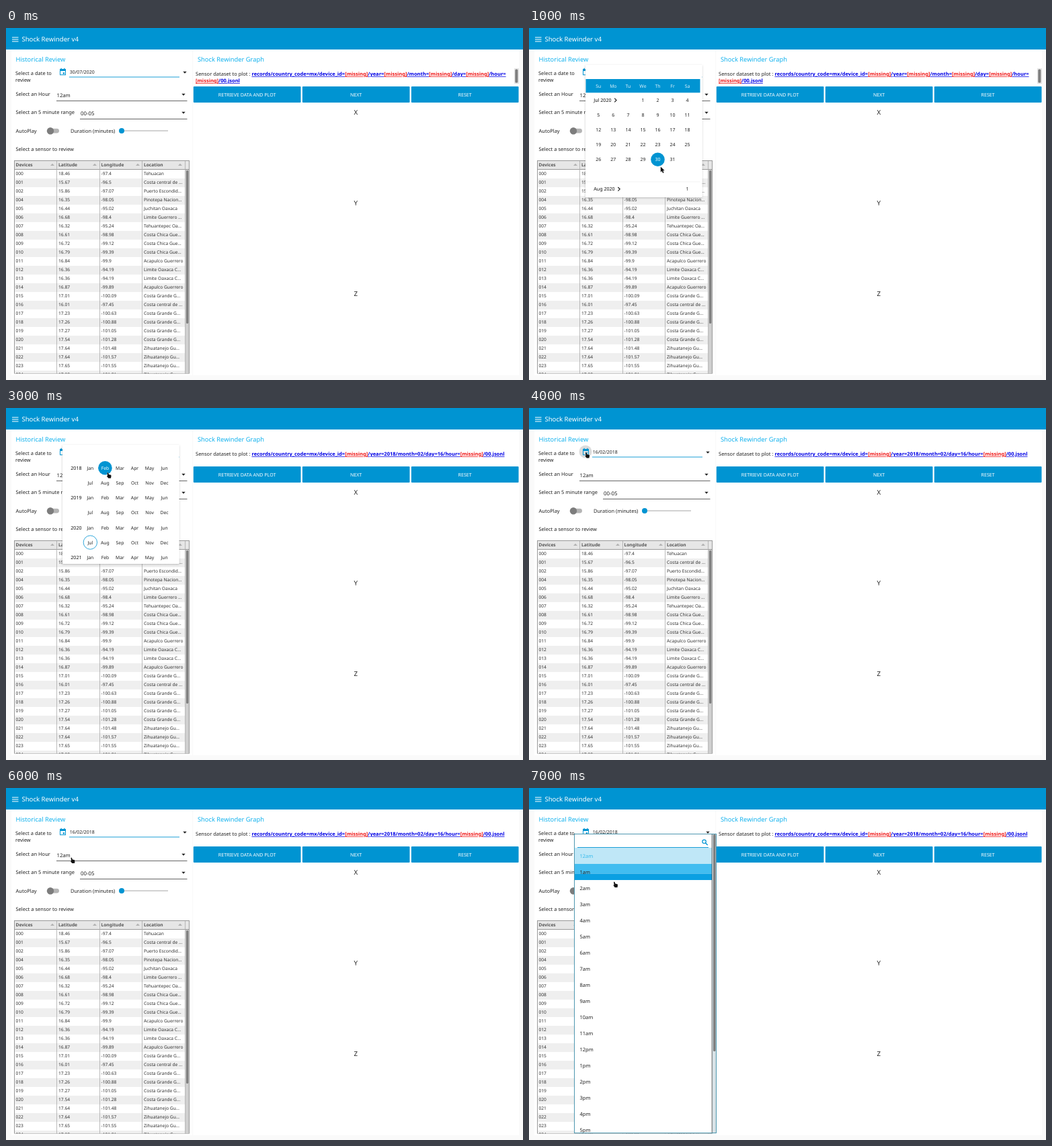
An HTML page that plays this animation: 769 px wide and 524 px high, repeating every 8000 ms.

```html
<!DOCTYPE html>
<html lang="en">
<head>
<meta charset="utf-8">
<title>Shock Rewinder v4</title>
<style>
  html, body { margin: 0; width: 100%; height: 100%; overflow: hidden; background: #fafafa; }
  svg { display: block; width: 769px; height: 524px; }
  text { font-family: "Noto Sans", sans-serif; font-size: 7.5px; fill: #222; white-space: pre; text-rendering: geometricPrecision; }
  .link tspan { font-weight: 700; fill: #0000e6; text-decoration: underline; }
  .link .miss { fill: #f01818; }
</style>
</head>
<body>
<svg id="stage" viewBox="0 0 769 524">
  <defs>
    <clipPath id="tableClip"><rect x="12" y="197" width="261" height="317.5"/></clipPath>
    <clipPath id="listClip"><rect x="67" y="68" width="212" height="446"/></clipPath>
    <filter id="shadow" x="-10%" y="-10%" width="120%" height="120%">
      <feDropShadow dx="0" dy="1" stdDeviation="1.6" flood-color="#000" flood-opacity=".22"/>
    </filter>
  </defs>
</svg>
<script>
const NS = 'http://www.w3.org/2000/svg';
const stage = document.getElementById('stage');
const BLUE = '#0094d2', CYAN = '#12b2ee', INK = '#222';

function add(parent, tag, attrs = {}, content) {
  const el = document.createElementNS(NS, tag);
  for (const key in attrs) el.setAttribute(key, attrs[key]);
  if (content !== undefined) el.textContent = content;
  parent.appendChild(el);
  return el;
}
const group = (parent, attrs) => add(parent, 'g', attrs);
const rect = (p, x, y, width, height, fill, more) => add(p, 'rect', { x, y, width, height, fill, ...more });
const disc = (p, cx, cy, r, fill, more) => add(p, 'circle', { cx, cy, r, fill, ...more });
const path = (p, d, fill, more) => add(p, 'path', { d, fill, ...more });
const stroke = (p, d, color, width = 1) => path(p, d, 'none', { stroke: color, 'stroke-width': width });
function text(p, x, y, str, size = 7.5, fill = INK, more = {}) {
  const el = add(p, 'text', { x, y, ...more }, str);
  el.style.fontSize = size + 'px';
  el.style.fill = fill;
  return el;
}
const centered = (p, x, y, str, size, fill, more) => text(p, x, y, str, size, fill, { 'text-anchor': 'middle', ...more });
const caret = (p, x, y) => path(p, `M${x - 2.7} ${y - 1.2}h5.4l-2.7 2.9z`, INK);

function drawShell(p) {
  rect(p, 0, 0, 769, 524, '#fafafa');
  rect(p, 8, 32, 269, 485, '#fff');
  rect(p, 278.5, 32, 484.5, 485, '#fff');
  rect(p, 0, 0, 769, 32, BLUE);
  stroke(p, 'M9 14h9.5M9 17h9.5M9 20h9.5', '#fff', 1.1);
  text(p, 23.4, 20, 'Shock Rewinder v4', 9.6, '#fff');
  text(p, 14.5, 50, 'Historical Review', 9.3, CYAN);
  text(p, 285, 50, 'Shock Rewinder Graph', 9.3, CYAN);
}

function drawForm(p) {
  text(p, 14, 70, 'Select a date to');
  text(p, 14, 80, 'review');
  stroke(p, 'M94 73h164', BLUE, .9);
  text(p, 14.5, 100.5, 'Select an Hour');
  text(p, 75.5, 102.5, '12am', 7.7);
  stroke(p, 'M75 108.5h194.5', '#555', .9);
  caret(p, 264, 99);
  text(p, 14.5, 127.5, 'Select an 5 minute range');
  text(p, 111, 129.5, '00-05', 7.8);
  stroke(p, 'M110 135.5h159.5', '#555', .9);
  caret(p, 264, 126);
  text(p, 14.5, 156, 'AutoPlay');
  rect(p, 62, 149.7, 17, 6.8, '#b5b5b5', { rx: 3.4 });
  disc(p, 66, 153.2, 5.2, '#7d7d7d');
  text(p, 96, 156, 'Duration (minutes)');
  stroke(p, 'M172 153h69', '#9a9a9a', .9);
  disc(p, 172, 153, 4, BLUE);
  text(p, 14.5, 183, 'Select a sensor to review');
}

const columns = [[14.5, 'Devices', 69], [78, 'Latitude', 132], [141.5, 'Longitude', 196], [205, 'Location', 259]];
const places = {
  T: 'Tehuacan', c: 'Costa central de …', P: 'Puerto Escondid…', N: 'Pinotepa Nacion…', J: 'Juchitan Oaxaca',
  L: 'Limite Guerrero …', O: 'Tehuantepec Oa…', C: 'Costa Chica Gue…', A: 'Acapulco Guerrero',
  X: 'Limite Oaxaca C…', G: 'Costa Grande G…', Z: 'Zihuatanejo Gu…'
};
const sensors = `18.46 -97.4 T|15.67 -96.5 c|15.86 -97.07 P|16.35 -98.05 N|16.44 -95.02 J|16.68 -98.4 L
|16.32 -95.24 O|16.61 -98.98 C|16.72 -99.12 C|16.79 -99.39 C|16.84 -99.9 A|16.36 -94.19 X|16.36 -94.19 X
|16.87 -99.89 A|17.01 -100.09 G|16.01 -97.45 c|17.23 -100.63 G|17.26 -100.88 G|17.27 -101.05 G
|17.54 -101.28 G|17.64 -101.48 Z|17.64 -101.57 Z|17.65 -101.55 Z|17.98 -101.81 Z`.split('|');

function drawTable(parent) {
  const p = group(parent, { 'clip-path': 'url(#tableClip)' });
  rect(p, 12, 197, 261, 318, '#fff');
  sensors.forEach((line, i) => {
    const y = 211 + 13 * i;
    if (i % 2) rect(p, 12, y, 254.5, 13, '#efefef');
    const [lat, lon, key] = line.trim().split(' ');
    const id = String(i < 3 ? i : i + 1).padStart(3, '0');
    [id, lat, lon, places[key]].forEach((cell, c) => text(p, columns[c][0], y + 8.4, cell, 6.65, '#333'));
  });
  rect(p, 12, 197, 261, 13.5, '#e6e6e6');
  stroke(p, 'M12 210.5h261', '#999');
  for (const [x, label, arrow] of columns) {
    text(p, x, 206, label, 6.65, '#555', { 'font-weight': 700 });
    path(p, `M${arrow - 3} 205h6l-3 -3.2z`, '#b2b2b2');
  }
  stroke(p, 'M75.5 197v318M139.5 197v318M202.5 197v318M266.5 197v318', '#aaa', .8);
  rect(p, 267, 211, 6, 304, '#cfcfcf');
  rect(p, 268, 212, 3.3, 228, '#7e7e7e', { rx: 1.6 });
  rect(p, 12.5, 197.5, 260, 317, 'none', { stroke: '#999' });
}

function drawPlots(p) {
  ['RETRIEVE DATA AND PLOT', 'NEXT', 'RESET'].forEach((label, i) => {
    const x = 278.8 + 162 * i;
    rect(p, x, 87, 159.7, 24, BLUE, { rx: 1 });
    centered(p, x + 79.8, 101.5, label, 7.05, '#fff');
  });
  ['X', 'Y', 'Z'].forEach((axis, i) => centered(p, 520.3, 128.5 + 135 * i, axis, 9.7));
}

// Unset parts of the dataset path are shown in red.
function drawPath(p, rows) {
  rows.forEach((row, i) => {
    const line = text(p, 282, 71 + 10 * i, '', 7.53, INK, { class: 'link' });
    if (!i) line.append('Sensor dataset to plot : ');
    row.split(/(\[missing\])/).filter(Boolean).forEach(part =>
      add(line, 'tspan', part === '[missing]' ? { class: 'miss' } : {}, part));
  });
}

function drawDate(p, date) {
  path(p, 'M80 61h1.5v-1.2h1.3v1.2h3.4v-1.2h1.3v1.2h1.5v9.2h-9zM81 64v5.2h7v-5.2z', BLUE, { 'fill-rule': 'evenodd' });
  rect(p, 84.7, 66.2, 2.4, 2.3, BLUE);
  text(p, 94.8, 68.4, date, 6.95);
}

function drawPopup(p, height) {
  rect(p, 84, 55, 173.5, height, '#fff', { filter: 'url(#shadow)' });
}
const colX = i => 103.3 + 22.05 * i;
const rowY = i => 107.5 + 22.05 * i;
const heading = (p, y, label) => text(p, 96.3, y + 2.5, label, 7.1, '#111', { 'font-weight': 500 });

function drawMonth(p, name, first, count, selected, next, nextFirst) {
  drawPopup(p, 197);
  rect(p, 84.5, 76, 170, 20.3, BLUE);
  'Su Mo Tu We Th Fr Sa'.split(' ').forEach((d, i) => centered(p, colX(i), 88.6, d, 6.9, '#d9f0fa'));
  [[name, 0], [next, 6]].forEach(([label, row]) => {
    const y = rowY(row);
    const end = 96.3 + heading(p, y, label).getComputedTextLength();
    stroke(p, `M${end + 4.7} ${y - 2.8}l2.8 2.8l-2.8 2.8`, INK, 1.2);
  });
  stroke(p, 'M84.5 229h170', '#f0f0f0', .8);
  for (let d = 1; d <= count; d++) {
    const slot = first + d - 1, x = colX(slot % 7), y = rowY(Math.floor(slot / 7));
    if (d === selected) disc(p, x, y, 10.3, BLUE);
    centered(p, x, y + 2.5, d, 7, d === selected ? '#fff' : INK);
  }
  for (let d = 1; nextFirst + d <= 7; d++) centered(p, colX(nextFirst + d - 1), rowY(6) + 2.5, d, 7);
}

const months = 'Jan Feb Mar Apr May Jun Jul Aug Sep Oct Nov Dec'.split(' ');
function drawYears(p, pickYear, pickMonth) {
  drawPopup(p, 177);
  for (let n = 0; n < 4; n++) {
    const year = 2018 + n, top = 89.2 + 44.4 * n;
    heading(p, top, year);
    months.slice(0, n === 3 ? 6 : 12).forEach((m, i) => {
      const x = colX(i % 6 + 1), y = top + (i > 5 ? 22.1 : 0);
      const picked = year === pickYear && m === pickMonth;
      if (picked) disc(p, x, y, 10.3, BLUE);
      else if (year === 2020 && m === 'Jul') disc(p, x, y, 10.2, '#fff', { stroke: BLUE, 'stroke-width': .8 });
      centered(p, x, y + 2.5, m, 6.8, picked ? '#fff' : INK);
    });
  }
}

function drawHours(parent) {
  const p = group(parent, { 'clip-path': 'url(#listClip)' });
  rect(p, 67, 68, 212, 446, '#fff');
  stroke(p, 'M72 88.5h195', BLUE, .9);
  disc(p, 260.6, 79.8, 2.7, 'none', { stroke: BLUE, 'stroke-width': 1.2 });
  stroke(p, 'M262.5 81.7l3.2 3.2', BLUE, 1.4);
  rect(p, 68, 89, 204, 24, '#bfe7f7');
  rect(p, 68, 113, 204, 14.5, '#42bdf0');
  rect(p, 68, 127.5, 204, 9.5, '#0ba0e2');
  for (let h = 0; h < 18; h++)
    text(p, 75.5, 103.8 + 24 * h, (h % 12 || 12) + (h < 12 ? 'am' : 'pm'), 7.5, h ? INK : '#35baec');
  rect(p, 272, 68, 7, 446, '#d8e2e6');
  rect(p, 274, 69, 3.5, 323, '#7d7d7d', { rx: 1.5 });
  stroke(p, 'M272.2 68v446', '#444', .8);
  rect(p, 67.5, 68.5, 211, 445, 'none', { stroke: '#3d8ea8', 'stroke-width': .9 });
}

const pointers = {
  arrow: 'M0 0v8l1.9 -1.6l1.4 3l1.5 -.7l-1.4 -2.9h2.5z',
  hand: 'M0 .6q.7 -1 1.5 0l.9 2.5l2.6 .5q1.1 .4 1 1.6l-.5 3.2h-3.8l-2.2 -2.8q-.1 -1 1.1 -.7z'
};
function drawPointer(p, kind, x, y) {
  path(p, pointers[kind], '#111', { transform: `translate(${x} ${y})`, stroke: '#fff', 'stroke-width': .6, 'paint-order': 'stroke' });
}

drawShell(stage);
drawForm(stage);
drawTable(stage);
drawPlots(stage);

const emptyPath = [
  'records/country_code=mx/device_id=[missing]/year=[missing]/month=[missing]/day=[missing]/hour=',
  '[missing]/00.jsonl'
];
const datedPath = ['records/country_code=mx/device_id=[missing]/year=2018/month=02/day=16/hour=[missing]/00.jsonl'];
const july = p => drawMonth(p, 'Jul 2020', 3, 31, 30, 'Aug 2020', 6);
const february = p => drawMonth(p, 'Feb 2018', 4, 28, 16, 'Mar 2018', 4);

const steps = [
  { at: 0, date: '30/07/2020' },
  { at: 1000, date: '30/07/2020', calendar: july, pointer: ['arrow', 195.8, 206.5] },
  { at: 2000, date: '30/07/2020', calendar: p => drawYears(p, 2020, 'Jul'), pointer: ['hand', 114, 106] },
  { at: 3000, date: '16/02/2018', dated: true, calendar: p => drawYears(p, 2018, 'Feb'), pointer: ['hand', 150.5, 96] },
  { at: 4000, date: '16/02/2018', dated: true, hover: true, pointer: ['hand', 84, 66] },
  { at: 5000, date: '16/02/2018', dated: true, hover: true, calendar: february, pointer: ['hand', 216, 155.8] },
  { at: 6000, date: '16/02/2018', dated: true, pointer: ['hand', 96.5, 103.5] },
  { at: 7000, date: '16/02/2018', dated: true, list: drawHours, pointer: ['hand', 126, 139.5] }
];
const LOOP = 8000;

for (const step of steps) {
  const p = step.el = group(stage, { visibility: 'hidden' });
  drawPath(p, step.dated ? datedPath : emptyPath);
  if (!step.dated) {
    rect(p, 756, 60, 7, 23, '#e4e4e4');
    rect(p, 757.3, 61.5, 4, 20, '#7e7e7e', { rx: 1.5 });
  }
  if (step.hover) disc(p, 84, 65, 9.5, '#dcdcdc');
  drawDate(p, step.date);
  if (step.calendar) step.calendar(p);
  else caret(p, 266, 66);
  if (step.list) step.list(p);
  if (step.pointer) drawPointer(p, ...step.pointer);
}

let shown;
const start = performance.now();
function tick(now) {
  const t = Math.max(0, now - start) % LOOP;
  const step = steps.filter(s => s.at <= t).pop();
  if (step !== shown) {
    if (shown) shown.el.setAttribute('visibility', 'hidden');
    step.el.setAttribute('visibility', 'visible');
    shown = step;
  }
  requestAnimationFrame(tick);
}
tick(start);
</script>
</body>
</html>
```
